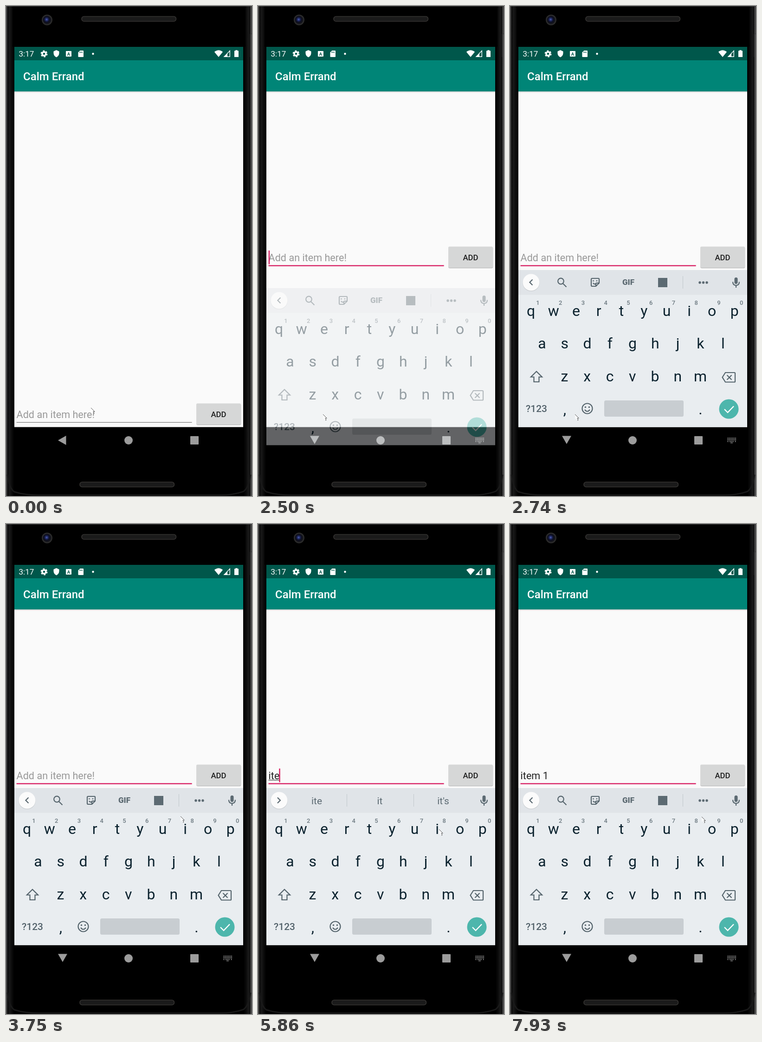
An HTML page for the animation above (8 s loop, 530x1056 px).

```html
<!DOCTYPE html>
<html lang="en">
<head>
<meta charset="utf-8">
<title>Todo app</title>
<style>
  html, body { margin: 0; width: 100%; height: 100%; overflow: hidden; background: #000; }
  svg { display: block; width: 530px; height: 1056px; font-family: Roboto, "Open Sans", sans-serif; }
  .mid { text-anchor: middle; }
  .key { font-size: 32px; fill: #0b222e; }
  .num { font-size: 13px; font-weight: 500; fill: #6c7980; }
  .word { font-size: 21px; fill: #5c6a72; }
  .line { fill: none; stroke: #55646c; stroke-width: 2.2; }
  .icon { fill: #5c6a72; }
  .field { font-size: 21.6px; white-space: pre; }
  .nav { fill: #9c9c9c; }
</style>
</head>
<body>
<svg viewBox="0 0 530 1056">
  <defs>
    <linearGradient id="body">
      <stop offset="0" stop-color="#555"/>
      <stop offset=".004" stop-color="#333"/>
      <stop offset=".007" stop-color="#0a0a0a"/>
      <stop offset=".014" stop-color="#191919"/>
      <stop offset=".024" stop-color="#0b0b0b"/>
      <stop offset=".033" stop-color="#000"/>
      <stop offset=".966" stop-color="#000"/>
      <stop offset=".976" stop-color="#0b0b0b"/>
      <stop offset=".986" stop-color="#1b1b1b"/>
      <stop offset=".991" stop-color="#0a0a0a"/>
      <stop offset=".994" stop-color="#3a3a3a"/>
      <stop offset="1" stop-color="#555"/>
    </linearGradient>
    <radialGradient id="lens" cx=".45" cy=".45">
      <stop offset="0" stop-color="#5365b8"/>
      <stop offset=".3" stop-color="#222c68"/>
      <stop offset=".65" stop-color="#0c0e20"/>
      <stop offset="1" stop-color="#15151b"/>
    </radialGradient>
    <pattern id="mesh" width="2" height="2" patternUnits="userSpaceOnUse">
      <path d="M0 0H2V2H0z" fill="#121212"/><path d="M0 0H1V1H0z" fill="#343434"/>
    </pattern>
    <linearGradient id="shade" x2="0" y2="1">
      <stop stop-color="#000" stop-opacity=".22"/><stop offset="1" stop-color="#000" stop-opacity="0"/>
    </linearGradient>
  </defs>

  <!-- phone -->
  <path d="M0 0H530V1056H0z" fill="url(#body)"/>
  <path d="M0 .5H530" stroke="#484848"/>
  <path d="M14 1H516V88H14z"/>
  <path d="M3 1010Q7 1040 18 1047Q40 1054 70 1054H460Q492 1054 512 1046Q523 1038 527 1010" fill="none" stroke="#191919" stroke-width="3"/>
  <path d="M526 60H530V1H526M526 60V110" fill="none" stroke="#343434"/>
  <circle cx="88.500" cy="30" r="11.500" fill="#2b2b2b"/>
  <circle cx="88.500" cy="30" r="9" fill="url(#lens)"/>
  <g fill="url(#mesh)" stroke="#373533" stroke-width="1.500">
    <rect x="163" y="22.500" width="203.500" height="10.500" rx="5"/>
    <rect x="159" y="1026" width="203.500" height="10.500" rx="5"/>
  </g>

  <!-- screen -->
  <path d="M18 88H511V965H18z"/>
  <path d="M18 184H511V907.500H18z" fill="#fafafa"/>
  <path d="M18 88H511V117H18z" fill="#00574b"/>
  <path d="M18 117H511V184H18z" fill="#008577"/>
  <path d="M18 184H511V187H18z" fill="url(#shade)"/>
  <text x="27.500" y="109" font-size="17" fill="#fff">3:17</text>
  <text x="37" y="160" font-size="24" font-weight="500" fill="#fff">Calm Errand</text>

  <!-- status icons -->
  <g fill="#fff">
    <circle cx="82" cy="103" r="4" fill="none" stroke="#fff" stroke-width="3.400"/>
    <circle cx="82" cy="103" r="6.300" fill="none" stroke="#fff" stroke-width="2.400" stroke-dasharray="3.600 3"/>
    <path d="M108.500 95L114.500 97.700V102Q114 108 108.500 110.500Q103 108 102.500 102V97.700z"/>
    <rect x="129" y="97" width="12" height="12" rx="1"/>
    <text class="mid" x="135" y="106.600" font-size="9.500" font-weight="700" fill="#00574b">A</text>
    <path d="M159.500 96H166Q167 96 167 97V109Q167 110 166 110H157Q155.500 110 155.500 109V100z"/>
    <path d="M159 98.500V101M161.500 98.500V101M164 98.500V101" stroke="#00574b" stroke-width="1.300"/>
    <circle cx="187.500" cy="103" r="2.200"/>
    <path d="M458 110L449 99Q458 91.500 467 99z"/>
    <path d="M482.300 96.500V109.300H470z" fill="none" stroke="#fff" stroke-width="1.400"/>
    <path d="M477 102V109H470.500z"/>
    <path d="M494.500 95H498.500V96.500H501V110H492V96.500H494.500z"/>
  </g>

  <!-- input row -->
  <g id="row">
    <rect x="410.500" y="858.500" width="95.500" height="45" rx="3" fill="#000" opacity=".1"/>
    <rect x="410" y="857.500" width="96.500" height="45.500" rx="3" fill="#000" opacity=".18"/>
    <rect x="410" y="856.500" width="96" height="45.500" rx="2.400" fill="#d6d7d7"/>
    <text class="mid" x="458" y="885.500" font-size="16.800" font-weight="500" fill="#1f1f1f">ADD</text>
    <text id="hint" class="field" x="22.600" y="888" fill="#999">Add an item here!</text>
    <text id="typed" class="field" x="22.600" y="888" fill="#222"></text>
    <rect id="compose" x="22.600" y="889.300" height="1.200" fill="#333"/>
    <rect id="rule" x="22.600" width="378"/>
    <rect id="caret" y="865" width="2.400" height="29.500" fill="#d81b60"/>
  </g>

  <!-- navigation bar -->
  <g class="nav">
    <path id="back" d=""/>
    <circle cx="264" cy="936" r="9"/>
    <rect x="397" y="927" width="18" height="18" rx="1"/>
    <path id="switch" d="M468.500 931.500H487M468.500 935H487M468.500 938.500H471M473 938.500H482.500M484.500 938.500H487M475.500 941.500H480" stroke="#9c9c9c" stroke-width="2" stroke-dasharray="2.100 1.200"/>
  </g>

  <!-- keyboard -->
  <g id="board">
    <path d="M18 569H511V907.500H18z" fill="#e9edf0"/>
    <path d="M18 569H511V622.500H18z" fill="#e0e4e8"/>
    <circle cx="45.500" cy="596.500" r="18.300" fill="#000" opacity=".1"/>
    <circle cx="45.500" cy="595.500" r="18" fill="#fbfbfb"/>
    <path id="chevron" class="line"/>
    <g id="tools">
      <circle class="line" cx="109.500" cy="593" r="6.300"/>
      <path class="line" d="M114 598L121.500 605.500"/>
      <path class="line" d="M177 587H190.500Q192 587 192 588.500V597L185 604H177Q175 604 175 602V589Q175 587 177 587zM192 597H187Q185 597 185 599V604" stroke-width="2"/>
      <path class="line" d="M179 597Q182 601 185 598M179.500 591V593.500M187 591V593.500" stroke-width="1.800"/>
      <text class="mid icon" x="255" y="601" font-size="17" font-weight="900">GIF</text>
      <rect class="icon" x="319" y="586" width="20" height="20"/>
      <path d="M372.500 582V609" stroke="#c1c7cb"/>
      <g class="icon"><circle cx="409" cy="596" r="2.700"/><circle cx="416.500" cy="596" r="2.700"/><circle cx="424" cy="596" r="2.700"/></g>
    </g>
    <g id="words">
      <path d="M191.500 582V609M335.500 582V609" stroke="#c1c7cb"/>
      <text class="mid word" x="126.500" y="603.500"></text>
      <text class="mid word" x="262.500" y="603.500"></text>
      <text class="mid word" x="399" y="603.500"></text>
    </g>
    <rect class="icon" x="483.500" y="585" width="7" height="14" rx="3.500"/>
    <path class="line" d="M480 594.500Q480 602 487 602Q494 602 494 594.500M487 602V607" stroke-width="1.900"/>
    <g id="keys"></g>
    <path class="line" d="M57 787.500L69 799.500H62.500V810H51.500V799.500H45z"/>
    <path class="line" d="M464 790H483.500Q485 790 485 791.500V809Q485 810.500 483.500 810.500H464L457.500 800.200zM467.500 795.500L477.500 805.500M477.500 795.500L467.500 805.500"/>
    <text class="mid" x="57" y="875" font-size="21" font-weight="500" fill="#52616a">?123</text>
    <text class="mid key" x="118" y="880">,</text>
    <circle class="line" cx="166.500" cy="867.500" r="11"/>
    <path class="line" d="M161 870Q166.500 877 172 870"/>
    <g class="icon"><circle cx="162.500" cy="864.500" r="1.800"/><circle cx="170.500" cy="864.500" r="1.800"/></g>
    <rect x="203" y="850" width="171" height="35" rx="3.500" fill="#c8cdd1"/>
    <text class="mid key" x="410.500" y="880">.</text>
    <circle cx="471.500" cy="868.500" r="21" fill="#4db6ac"/>
    <path d="M462 869L469 876L482 862.500" fill="none" stroke="#fff" stroke-width="2.400"/>
  </g>

  <!-- pointer -->
  <g id="pointer">
    <path d="M0 0V11L2.500 8.800L4.500 13L6.500 12L4.700 8.300H8.500z" fill="#fff" opacity=".7"/>
    <path d="M0 0L8.300 8.300H5L7 12.300L5 13" fill="none" stroke="#444" stroke-width=".9"/>
  </g>
</svg>
<script>
const LOOP = 8000;
const $ = id => document.getElementById(id);
const show = (id, on) => $(id).style.display = on ? '' : 'none';

// Each track lists [start ms, value...]; a value holds until the next entry.
const pointer = [
  [0, 183, 866], [500, 176, 866], [680, 163, 850], [800, 147, 832], [920, 136.5, 819],
  [1070, 138, 840], [1190, 139.500, 856], [1340, 140, 866], [1460, 140, 874], [1580, 140, 880],
  [3450, 213, 665], [3600, 330, 618], [3750, 376, 630], [3870, 391, 635],
  [4020, 392, 650], [4140, 393, 658], [4390, 390, 658], [7930, 413, 631]
];
const slide = [[0, 0, 0], [2500, 39, .42], [2620, 22.300, .77], [2740, 0, 1]];
const caret = [
  [0, 0], [2230, 1], [2740, 0], [3140, 1], [3750, 0], [4140, 1],
  [4660, 0], [5060, 1], [6670, 0], [7230, 1], [7930, 0]
];
const typed = [[0, ''], [5060, 'i'], [5460, 'it'], [5860, 'ite'], [6260, 'item'], [7230, 'item '], [7500, 'item 1']];
const words = [
  [0, ''], [5180, 'i|I|I\'m'], [5610, 'it|it\'s|is'], [5860, 'ite|it|it\'s'],
  [6260, 'item|items|item\'s'], [7230, 'is|and|in'], [7500, '']
];
const at = (track, t) => track.findLast(step => step[0] <= t).slice(1);

function addKeys() {
  let out = '';
  const put = (text, x, y, kind) => out += `<text class="mid ${kind}" x="${x}" y="${y}">${text}</text>`;
  [['qwertyuiop', 45, 668], ['asdfghjkl', 69, 738], ['zxcvbnm', 117.500, 809]].forEach(([row, x, y]) =>
    [...row].forEach((c, i) => put(c, x + i * 48.750, y, 'key')));
  [...'1234567890'].forEach((c, i) => put(c, 60 + i * 48.750, 643.500, 'num'));
  $('keys').innerHTML = out;
}

function draw(t) {
  const [x, y] = at(pointer, t);
  $('pointer').setAttribute('transform', `translate(${x} ${y})`);

  const open = t >= 2500, focus = t >= 1980;
  const [dy, alpha] = at(slide, t);
  show('board', open);
  $('board').setAttribute('transform', `translate(0 ${dy})`);
  $('board').setAttribute('opacity', alpha);
  $('row').setAttribute('transform', `translate(0 ${open ? -338 : 0})`);
  $('back').setAttribute('d', open ? 'M112 926.500H132L122 944z' : 'M112 936L129.500 926V946z');
  show('switch', t >= 2350);

  const rule = $('rule');
  rule.setAttribute('y', focus ? 896.500 : 896.800);
  rule.setAttribute('height', focus ? 2.300 : 1.200);
  rule.setAttribute('fill', focus ? '#d81b60' : '#757575');

  const [text] = at(typed, t);
  const field = $('typed');
  if (field.textContent !== text) field.textContent = text;
  const width = text ? field.getComputedTextLength() : 0;
  show('hint', !text);
  $('compose').setAttribute('width', t < 7230 ? width : 0);
  $('caret').setAttribute('x', Math.max(22.800, 21.600 + width));
  show('caret', at(caret, t)[0]);

  const [list] = at(words, t);
  show('tools', !list);
  show('words', list);
  $('chevron').setAttribute('d', list ? 'M42 589.500L48 595.500L42 601.500' : 'M48.500 589.500L42.500 595.500L48.500 601.500');
  const parts = list.split('|');
  document.querySelectorAll('#words text').forEach((el, i) => el.textContent = parts[i] || '');
}

addKeys();
const start = performance.now();
function tick() {
  draw((performance.now() - start) % LOOP);
  requestAnimationFrame(tick);
}
tick();
</script>
</body>
</html>
```
